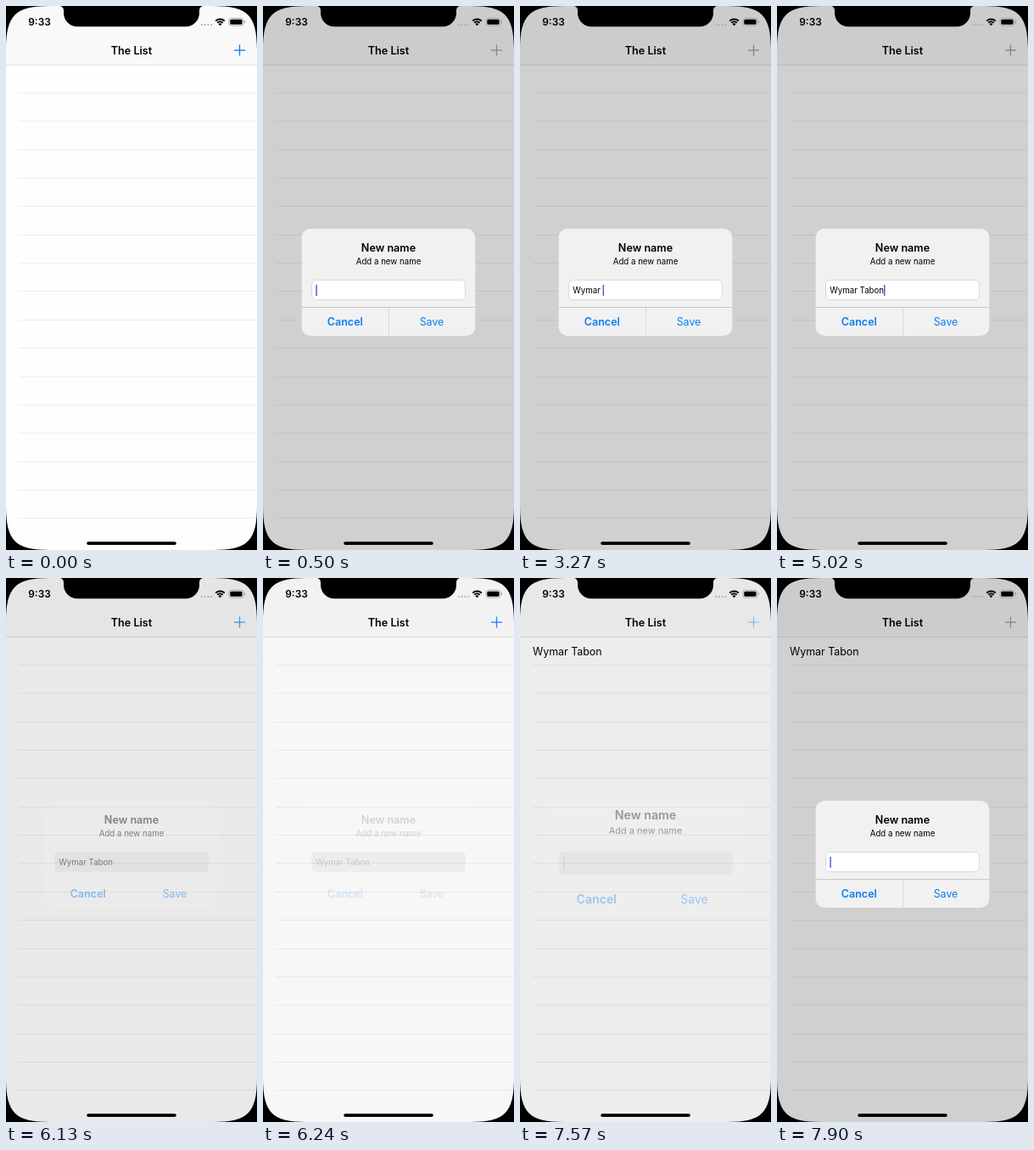
An HTML page with a canvas that plays this animation: 296 px wide and 640 px high, repeating every 8000 ms.

```html
<!DOCTYPE html>
<html lang="en">
<head>
<meta charset="utf-8">
<title>The List</title>
<style>
  html, body { margin: 0; width: 100%; height: 100%; overflow: hidden; background: #000; }
  canvas { display: block; width: 296px; height: 640px; }
</style>
</head>
<body>
<canvas id="stage"></canvas>
<script>
const W = 296, H = 640, LOOP = 8000;
const NAME = 'Wymar Tabon';
const BLUE = '#0a7cf5';
const canvas = document.getElementById('stage');
const ctx = canvas.getContext('2d');
const dpr = window.devicePixelRatio || 1;
canvas.width = W * dpr;
canvas.height = H * dpr;

// [time, typed characters]
const typing = [[2270, 1], [2430, 2], [2620, 3], [3010, 4], [3270, 6],
                [3760, 7], [4050, 8], [4230, 9], [5020, 11]];
const fadeOut = [0.95, 0.8, 0.45, 0.15, 0.06, 0.02, 0];
const fadeIn = [0.36, 0.76, 0.96, 1];

const step = (list, t, gap) => list[Math.min(list.length - 1, Math.floor(t / gap))];

function dialogLevel(t) {
  if (t < 500) return 0;
  if (t < 5890) return 1;
  if (t < 7570) return step(fadeOut, t - 5890, 111);
  return step(fadeIn, t - 7570, 110);
}

function typedText(t) {
  if (t >= 6800) return '';
  let count = 0;
  for (const [at, n] of typing) if (t >= at) count = n;
  return NAME.slice(0, count);
}

function caretLevel(t) {
  if (t >= 7570) return 1;
  if (t >= 5650) return 0;
  if (t < 1040 || t >= 1820) return 1;
  return t < 1160 || t >= 1700 ? 0.45 : 0;
}

function rect(x, y, w, h, color) {
  ctx.fillStyle = color;
  ctx.fillRect(x, y, w, h);
}

function round(x, y, w, h, r, fill, stroke, width = 1) {
  ctx.beginPath();
  ctx.roundRect(x, y, w, h, r);
  if (fill) { ctx.fillStyle = fill; ctx.fill(); }
  if (stroke) { ctx.strokeStyle = stroke; ctx.lineWidth = width; ctx.stroke(); }
}

function text(str, x, y, size, { weight = 400, color = '#000', align = 'center' } = {}) {
  ctx.font = `${weight} ${size}px Inter, "Liberation Sans", sans-serif`;
  ctx.textAlign = align;
  ctx.fillStyle = color;
  ctx.fillText(str, x, y);
}

function drawList(showName) {
  rect(0, 0, W, H, '#fefefe');
  rect(0, 0, W, 69, '#f9f9f9');
  rect(0, 69, W, 1, '#e2e2e2');
  for (let i = 0; i < 16; i++) rect(15, Math.round(102 + i * 33.35), W - 15, 1, '#eeeeee');
  if (showName) text(NAME, 15, 90.5, 12.4, { align: 'left' });
}

function drawStatus() {
  text('9:33', 39.5, 23, 11.9, { weight: 600 });
  ctx.fillStyle = '#a8a8a8';
  for (let i = 0; i < 4; i++) {
    ctx.beginPath();
    ctx.arc(231 + i * 3.7, 22, 1, 0, 7);
    ctx.fill();
  }
  ctx.strokeStyle = '#000';
  ctx.lineWidth = 1.9;
  for (const r of [4.6, 7.5]) {
    ctx.beginPath();
    ctx.arc(252.5, 23, r, -Math.PI * 0.75, -Math.PI * 0.25);
    ctx.stroke();
  }
  ctx.fillStyle = '#000';
  ctx.beginPath();
  ctx.moveTo(252.5, 23.3);
  ctx.arc(252.5, 23.3, 2.8, -Math.PI * 0.75, -Math.PI * 0.25);
  ctx.fill();
  round(262.9, 14.4, 17, 8.8, 2.6, null, '#a0a0a0', 0.8);
  round(264.3, 15.8, 14.2, 6, 1.5, '#000');
  round(280.8, 17.3, 1.2, 3, 0.6, '#a0a0a0');
}

function drawPlus(level, pressed) {
  const mark = (color, alpha) => {
    ctx.globalAlpha = alpha;
    rect(269, 51.4, 13, 1.3, color);
    rect(274.85, 45.5, 1.3, 13, color);
  };
  if (level < 1) mark(BLUE, pressed ? 0.38 : 1 - level * 0.6);
  if (level > 0.5) mark('#858585', level);
  ctx.globalAlpha = 1;
}

function drawDialog(t, level) {
  const opening = t >= 7570;
  const scale = opening ? 1 + 0.2 * (1 - level) : 1;
  const typed = typedText(t);
  ctx.save();
  ctx.translate(148, 325);
  ctx.scale(scale, scale);
  ctx.translate(-148, -325);
  ctx.globalAlpha = level * level;
  round(45.6, 262, 204.8, 126, 10.6, '#f1f1f1');
  ctx.globalAlpha = 1;
  if (level === 1) {
    round(57.6, 322.4, 180.8, 23.2, 5, '#fff', '#cccccc', 0.7);
    rect(45.6, 354, 204.8, 1, '#c8c8c8');
    rect(148, 355, 1, 33, '#dcdcdc');
  } else {
    round(57, 322, 182, 24, 5, 'rgba(0,0,0,0.04)');
  }
  ctx.globalAlpha = level;
  text('New name', 148, 289, 12.6, { weight: 600 });
  text('Add a new name', 148, 304, 9.7);
  text(typed, 62.3, 338, 9.7, { align: 'left' });
  const caretX = 62.3 + ctx.measureText(typed).width;
  ctx.globalAlpha = level * level * caretLevel(t);
  rect(caretX, 328, 1.5, 13, '#4267d8');
  ctx.globalAlpha = level;
  text('Cancel', 96.8, 376.3, 12.5, { weight: 600, color: BLUE });
  text('Save', 199, 376.3, 12.4, { color: BLUE });
  ctx.restore();
}

function drawBezel() {
  const far = 52, near = 10.7;
  ctx.fillStyle = '#000';
  for (const [sx, sy] of [[1, 1], [-1, 1], [1, -1], [-1, -1]]) {
    ctx.save();
    ctx.translate(sx < 0 ? W : 0, sy < 0 ? H : 0);
    ctx.scale(sx, sy);
    ctx.beginPath();
    ctx.moveTo(0, 0);
    ctx.lineTo(0, far);
    ctx.bezierCurveTo(0, near, near, 0, far, 0);
    ctx.fill();
    ctx.restore();
  }
  ctx.beginPath();
  ctx.moveTo(62, 0);
  ctx.arcTo(68, 0, 68, 5, 5);
  ctx.arcTo(68, 24.2, 90, 24.2, 16);
  ctx.arcTo(228, 24.2, 228, 6, 16);
  ctx.arcTo(228, 0, 234, 0, 5);
  ctx.lineTo(234, 0);
  ctx.fill();
  round(95.2, 630.2, 105.6, 3.8, 1.9, '#000');
}

function draw(t) {
  const level = dialogLevel(t);
  ctx.setTransform(dpr, 0, 0, dpr, 0, 0);
  drawList(t >= 6450);
  if (level > 0) rect(0, 0, W, H, `rgba(0,0,0,${0.18 * level})`);
  drawStatus();
  text('The List', 148, 57, 12.6, { weight: 600 });
  drawPlus(level, t >= 7260 && level < 0.5);
  if (level > 0) drawDialog(t, level);
  drawBezel();
}

const start = performance.now();
function tick() {
  draw((performance.now() - start) % LOOP);
  requestAnimationFrame(tick);
}
tick();
</script>
</body>
</html>
```
